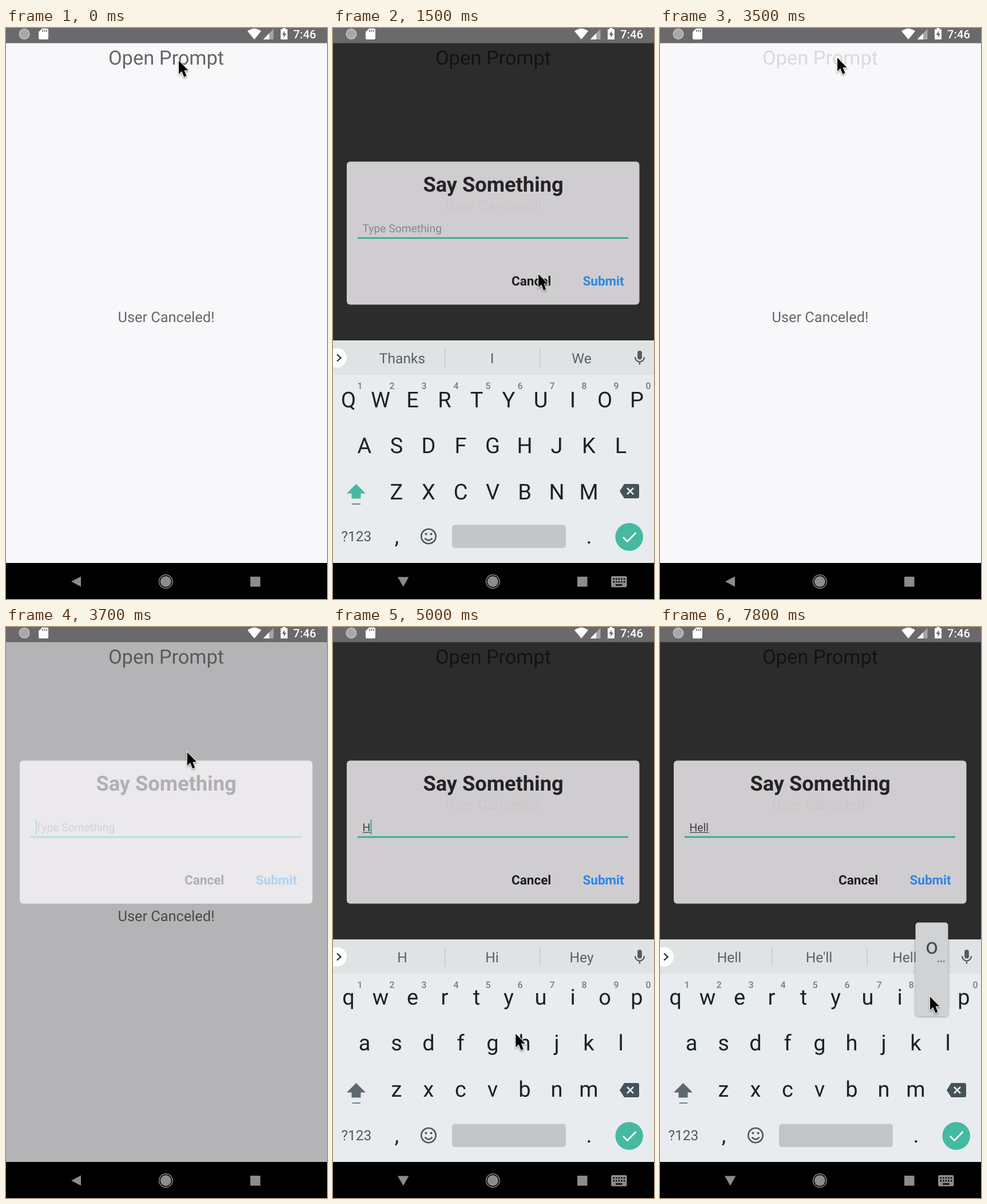
Recreate the animation shown at these times as an HTML page. Size 561 by 998 pixels, loop 8000 ms.

```html
<!DOCTYPE html>
<html lang="en">
<head>
<meta charset="utf-8">
<title>Prompt dialog</title>
<style>
html, body { margin: 0; width: 100%; height: 100%; overflow: hidden; background: #f8f7fa; }
svg { display: block; width: 100vw; height: 100vh; }
text { font-family: Roboto, sans-serif; text-rendering: geometricPrecision; white-space: pre; }
.mid { text-anchor: middle; }
.page { fill: #666668; }
.bold { font-weight: 700; font-size: 22.5px; }
.input { font-size: 19.3px; }
.word { font-size: 24.6px; fill: #56626a; }
.key { font-size: 38px; fill: #17242a; }
.hint { font-size: 16px; font-weight: 500; fill: #737d82; }
#mouse { filter: drop-shadow(0 2px 1.5px rgba(0,0,0,.35)); }
#popup { filter: drop-shadow(0 1px 2px rgba(0,0,0,.35)); }
</style>
</head>
<body>
<svg viewBox="0 0 561 998">
  <rect width="561" height="998" fill="#f8f7fa"/>
  <text id="open" class="mid page" x="280" y="63.5" font-size="34.4">Open Prompt</text>
  <text id="label" class="mid page" x="280" font-size="25.3">User Canceled!</text>

  <g id="modal">
    <rect width="561" height="998" fill="#010001" fill-opacity=".82"/>
    <rect x="24" y="233.5" width="511.5" height="250" rx="6" fill="#fffcff" fill-opacity=".777"/>
    <text class="mid" x="280" y="286" font-size="36.2" font-weight="700" fill="#252326">Say Something</text>
    <text id="placeholder" class="input" x="51.5" y="357" fill="#89878a">Type Something</text>
    <text id="typed" class="input" x="51.5" y="357" fill="#3e3c40"></text>
    <rect id="typedLine" x="52" y="358.5" height="1.3" fill="#4a484b"/>
    <rect x="43" y="365.7" width="473" height="2.7" fill="#2bac8f"/>
    <rect id="caret" y="336.5" width="2" height="26" fill="#2bac8f"/>
    <text id="cancel" class="bold" x="312" y="449.5" fill="#1f1d20">Cancel</text>
    <text class="bold" x="436.5" y="449.5" fill="#2a86ea">Submit</text>
  </g>

  <g id="keyboard">
    <rect y="546" width="561" height="390" fill="#e8ecee"/>
    <rect y="546" width="561" height="60" fill="#dfe3e4"/>
    <path d="M196 560v33M362 560v33" stroke="#c0c6c9" stroke-width="1.3"/>
    <circle cx="7" cy="576.5" r="17" fill="#fff"/>
    <path d="M7 570.5l6.5 6-6.5 6" fill="none" stroke="#222c31" stroke-width="2.3"/>
    <g id="words"></g>
    <g fill="none" stroke="#505b61" stroke-width="2.2">
      <rect x="533.2" y="565.2" width="5.6" height="13" rx="2.8" fill="#505b61"/>
      <path d="M528 575a8 8.5 0 0 0 16 0M536 583v5.5"/>
    </g>
    <g id="keys"></g>
    <path id="shift" d="M40.500 797L57 813.500H48.500V822.500H32.500V813.500H24Z"/>
    <path d="M33.500 832h14.500" stroke="#68747a" stroke-width="1.8"/>
    <path d="M509 797h23q3 0 3 3v19q0 3-3 3h-23l-8-12.500z" fill="#45535b"/>
    <path d="M514 804l11 11m0-11l-11 11" stroke="#e8ecee" stroke-width="2.6"/>
    <text x="14.500" y="897" font-size="24.5" fill="#4d5a61">?123</text>
    <text class="mid key" x="111.500" y="901">,</text>
    <text class="mid key" x="447.500" y="901">.</text>
    <g fill="none" stroke="#4b575d" stroke-width="2.6">
      <circle cx="167" cy="888.500" r="12.700"/>
      <path d="M160.500 891.500q6.500 8 13 0"/>
    </g>
    <path d="M162.500 884.500h.01M171.500 884.500h.01" stroke="#4b575d" stroke-width="4" stroke-linecap="round"/>
    <rect x="208" y="868.500" width="199" height="40.500" rx="5" fill="#c3c6c8"/>
    <circle cx="517.700" cy="889.500" r="24.300" fill="#46b9a1"/>
    <path d="M507 890l7.500 7.500 15-15.500" fill="none" stroke="#fff" stroke-width="2.700"/>
    <g id="popup">
      <rect x="-28.500" y="-143" width="57" height="163.500" rx="5" fill="#d0d2d4"/>
      <text id="popChar" class="mid" y="-89" font-size="38" fill="#414c52"></text>
      <path id="popDots" d="M10.500-75h2.200m2.600 0h2.200m2.600 0h2.200" stroke="#414c52" stroke-width="2"/>
    </g>
  </g>

  <rect y="935" width="561" height="63"/>
  <g fill="#8d8b8d">
    <path id="back"/>
    <circle cx="279.300" cy="967.500" r="9.500"/>
    <circle cx="279.300" cy="967.500" r="11.800" fill="none" stroke="#8d8b8d" stroke-width="1.500"/>
    <rect x="427" y="959" width="17.500" height="17.500"/>
    <g id="kbIcon">
      <rect x="486" y="958" width="27.500" height="19.500" rx="2.500"/>
      <path d="M489.500 963h21M489.500 968h21" stroke="#000" stroke-width="2.500" stroke-dasharray="2.500 2.100"/>
      <path d="M494 973.500h11.500" stroke="#000" stroke-width="2.500"/>
    </g>
  </g>

  <rect width="561" height="26.500" fill="#6b696b"/>
  <circle cx="32" cy="10.500" r="8.700" fill="#a9a7a9" stroke="#c9c7c9" stroke-width="1.500"/>
  <g fill="#fff">
    <path d="M63 1h9q2 0 2 2v15q0 2-2 2H59q-2 0-2-2V7z"/>
    <path d="M422 5.500q12-9 24 0L434 20z"/>
    <path d="M467.500 1.500V20H449.500z" fill-opacity=".4"/>
    <path d="M460 9.300V20H449.500z"/>
    <path d="M483.500 0h5v2h3.500v18h-12V2h3.500z"/>
    <text x="502" y="18" font-size="20.300" font-weight="500">7:46</text>
  </g>
  <path d="M64 3v4M67.500 3v4M71 3v4" stroke="#6b696b" stroke-width="1.500"/>
  <path d="M487 5l-4.500 7h3v5l4.500-7h-3z" fill="#6b696b"/>

  <path id="mouse" d="M0 0V23.500L5.200 18.600 9.200 28.500 13.500 26.700 9.500 17H16.500Z" stroke="#fff" stroke-width="2" paint-order="stroke"/>
</svg>
<script>
const LOOP = 8000, STEP = 100;
const $ = id => document.getElementById(id);
const set = (id, attrs) => {
  for (const name in attrs) $(id).setAttribute(name, attrs[name]);
};
const show = (id, on) => set(id, { visibility: on ? 'inherit' : 'hidden' });

// Key rows: letters, first centre, lowercase baseline
const rows = [['qwertyuiop', 27, 659.5], ['asdfghjkl', 55, 740], ['zxcvbnm', 111, 821]];
const letters = {};
const label = (cls, x, y, s) => `<text class="mid ${cls}" x="${x}" y="${y}">${s}</text>`;
let markup = '';
for (const [chars, x0, y] of rows)
  [...chars].forEach((c, i) => {
    const x = x0 + i * 56;
    letters[c] = { x, y };
    markup += label('key', x, y, c);
    if (y < 700) markup += label('hint', x + 20, 631, (i + 1) % 10);
  });
$('keys').innerHTML = markup;
$('words').innerHTML = [121, 278, 434.5].map(x => label('word', x, 586, '')).join('');
const keyTexts = [...document.querySelectorAll('#keys .key')];
const wordTexts = [...$('words').children];

// Key presses: character, down, up
const presses = [['H', 4500, 4800], ['e', 5700, 5900], ['l', 6500, 6700], ['l', 7000, 7200], ['o', 7600, 8000]];
const suggestions = [
  ['Thanks', 'I', 'We'], ['H', 'Hi', 'Hey'], ['He', 'Hey', 'Hello'],
  ['Hel', 'Hello', 'Help'], ['Hell', "He'll", 'Hello']
];

// Pointer stops: time, x, y
const path = [
  [0, 302, 57], [350, 302, 57], [500, 302, 60], [650, 302, 60], [900, 244, 374], [1100, 254, 384],
  [1500, 359, 430], [2050, 359, 430], [2400, 327, 154], [2700, 310, 45], [3100, 309, 45],
  [3300, 310, 52], [3550, 310, 52], [4000, 336, 695], [4300, 334, 716], [4900, 334, 716],
  [5500, 136, 648], [5950, 136, 648], [6400, 500, 724], [7250, 500, 724], [7550, 472, 646], [LOOP, 472, 646]
];

const ramp = (t, start, length) => Math.min(1, Math.max(0, (t - start) / length));
const pressed = (t, down, up) => 1 - .8 * (ramp(t, down, 150) - ramp(t, up, 250));

function pointer(t) {
  const i = path.findIndex(p => p[0] > t);
  const [t0, x0, y0] = path[i - 1], [t1, x1, y1] = path[i];
  const k = ramp(t, t0, t1 - t0), e = k * k * (3 - 2 * k);
  return `translate(${x0 + (x1 - x0) * e} ${y0 + (y1 - y0) * e})`;
}

function draw(t) {
  const modal = ramp(t, 810, 300) - ramp(t, 1900, 300) + ramp(t, 3600, 300);
  const board = ramp(t, 980, 230) - ramp(t, 1950, 200) + ramp(t, 3770, 230);
  const up = board > 0;

  set('open', { opacity: Math.min(pressed(t, 350, 650), pressed(t, 3150, 3500)) });
  set('label', { y: up ? 319 : 514 });
  set('modal', { opacity: modal });
  set('cancel', { opacity: pressed(t, 1600, 1850) });
  set('keyboard', { transform: `translate(0 ${(1 - board) * 390})` });
  show('keyboard', up);
  show('kbIcon', up);
  set('back', { d: up ? 'M113 959.500h19.500l-9.700 17z' : 'M131 958.500v18l-17-9z' });

  const done = presses.filter(p => t >= p[2]);
  const count = done.length;
  const text = done.map(p => p[0]).join('');
  $('typed').textContent = text;
  const width = count ? $('typed').getComputedTextLength() : 0;
  set('typedLine', { width });
  show('placeholder', !count);
  const focus = count ? done[count - 1][2] : t < 3500 ? 800 : 3500;
  set('caret', { x: 51.8 + width });
  show('caret', t >= focus && (t - focus) % 1000 < 500);

  const upper = !count;
  for (const el of keyTexts) {
    const c = el.textContent.toLowerCase();
    el.textContent = upper ? c.toUpperCase() : c;
    el.setAttribute('y', letters[c].y + (upper ? 3 : 0));
  }
  set('shift', { fill: upper ? '#46b9a1' : '#5d696f' });
  wordTexts.forEach((el, i) => el.textContent = suggestions[count][i]);

  const press = presses.find(p => t >= p[1] && t < p[2]);
  show('popup', press);
  if (press) {
    const { x, y } = letters[press[0].toLowerCase()];
    set('popup', { transform: `translate(${x} ${y})` });
    $('popChar').textContent = press[0];
    show('popDots', 'eo'.includes(press[0]));
  }

  set('mouse', { transform: pointer(t) });
  show('mouse', t < 6000 || t >= 6200);
}

function tick() {
  draw(Math.floor(performance.now() % LOOP / STEP) * STEP);
  requestAnimationFrame(tick);
}
tick();
</script>
</body>
</html>
```
